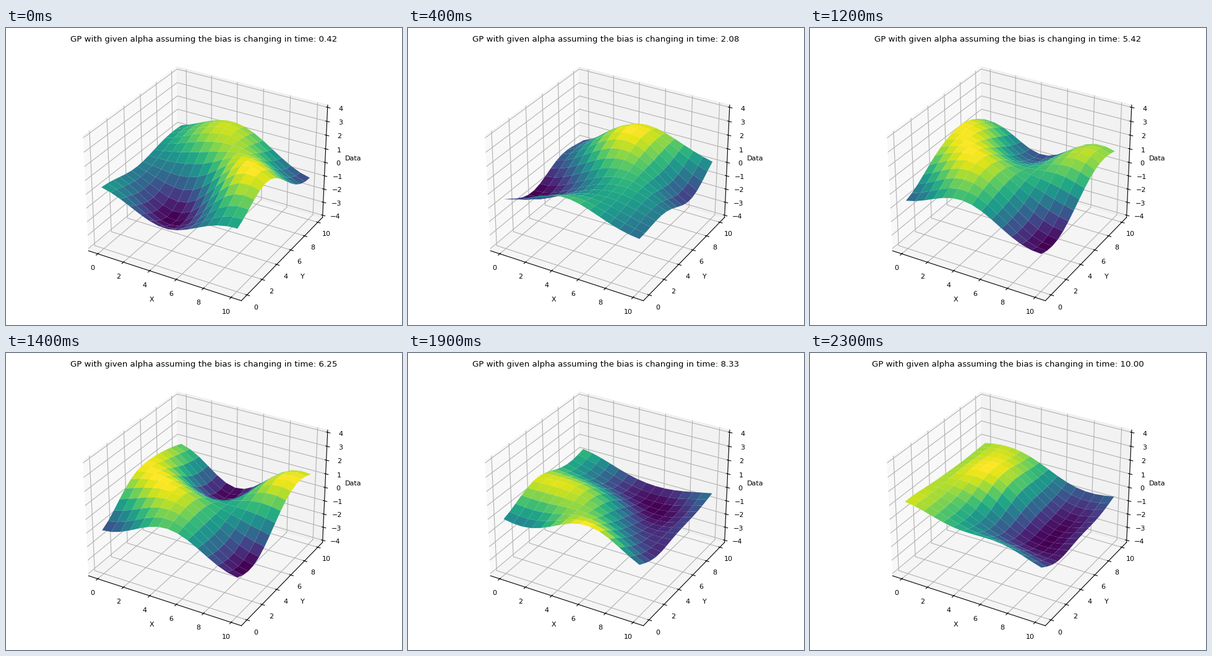
A matplotlib script for the animation above (2.4 s loop, 640 by 480 pixels).

```python
import numpy as np
import matplotlib.pyplot as plt
from matplotlib.animation import FuncAnimation

plt.rcParams["font.family"] = "DejaVu Sans"
plt.rcParams["font.size"] = 8

W, H, DPI = 640, 480, 100
FRAMES = 24
TITLE = "GP with given alpha assuming the bias is changing in time: {:.2f}"
SPACE_SCALE, TIME_SCALE = 2.6, 1.5

# Peaks and pits (x, y, height) seen at a few time steps.
EXTREMES = {
    1: [(5, 2, -1.7), (8, 4, 2), (4, 9, 1.8), (10, 10, -1), (0, 2, 0.1)],
    5: [(0.5, 3, -1.6), (3.5, 8.5, 1.6), (10, 6, -1), (4.5, 0.5, 0.8),
        (7, 5, 0.8), (10, 10, 0.2)],
    9: [(0, 2, -1.2), (9, 1, -1.5), (5, 8, 1.4), (10, 8, -1.1),
        (0, 10, -1.2)],
    13: [(9, 1, -1.5), (2.5, 3, 1.7), (1, 8.5, 1.3), (5, 8.5, -0.5),
         (8.5, 8, 1.5)],
    18: [(10, 2, -1.4), (2.5, 8, -1.3), (0, 4, 0.9), (5, 0.5, 0.9),
         (1, 0, -1)],
    22: [(7.5, 7, -1.5), (7.5, 0, 0.8), (0, 0, 0.8), (4, 6, 0.8),
         (1.5, 10, 0.8), (10, 3, -1)],
    24: [(7.5, 7.5, -1.3), (10, 2, -1.3), (6, 2.5, -0.9), (3, 6.5, 1.3),
         (1, 10, 1)],
}


def time_of(step):
    return step * 10 / FRAMES


def kernel(a, b):
    """Squared exponential covariance of (x, y, t) points."""
    scale = np.array([SPACE_SCALE, SPACE_SCALE, TIME_SCALE])
    gap = (a[:, None] - b[None]) / scale
    return np.exp(-0.5 * (gap ** 2).sum(axis=-1))


points = np.array([(x, y, time_of(step))
                   for step, seen in EXTREMES.items() for x, y, _ in seen])
heights = np.array([z for seen in EXTREMES.values() for *_, z in seen])
noise = 1e-3 * np.eye(len(points))
alpha = np.linalg.solve(kernel(points, points) + noise, heights)

grid = np.linspace(0, 10, 15)
X, Y = np.meshgrid(grid, grid)


def surface(t):
    """Mean of the Gaussian process over the grid at time t."""
    where = np.column_stack([X.ravel(), Y.ravel(), np.full(X.size, t)])
    return (kernel(where, points) @ alpha).reshape(X.shape)


def padded(lo, hi):
    pad = (hi - lo) / 48
    return lo - pad, hi + pad


fig = plt.figure(figsize=(W / DPI, H / DPI), dpi=DPI)
side, bottom = 439.8, 11.5
ax = fig.add_axes([0.5 - side / 2 / W, bottom / H, side / W, side / H],
                  projection="3d")
ax.set_xlim(*padded(-0.5, 10.5))
ax.set_ylim(*padded(-0.5, 10.5))
ax.set_zlim(*padded(-4, 4))
ax.set_xticks(range(0, 11, 2))
ax.set_yticks(range(0, 11, 2))
ax.set_zticks(range(-4, 5))
ax.tick_params(pad=1.4)
ax.set_xlabel("X", labelpad=-0.8)
ax.set_ylabel("Y", labelpad=-0.8)
ax.set_zlabel("Data", labelpad=-0.8)
title = fig.text(0.5, 458 / H, "", ha="center", va="baseline",
                 fontsize="large")
shown = []


def update(i):
    while shown:
        shown.pop().remove()
    t = time_of(i + 1)
    shown.append(ax.plot_surface(X, Y, surface(t), cmap="viridis"))
    title.set_text(TITLE.format(t))
    return [*shown, title]


anim = FuncAnimation(fig, update, frames=FRAMES, interval=100,
                     init_func=lambda: update(0), repeat=True,
                     repeat_delay=0, blit=False)
plt.show()
```
